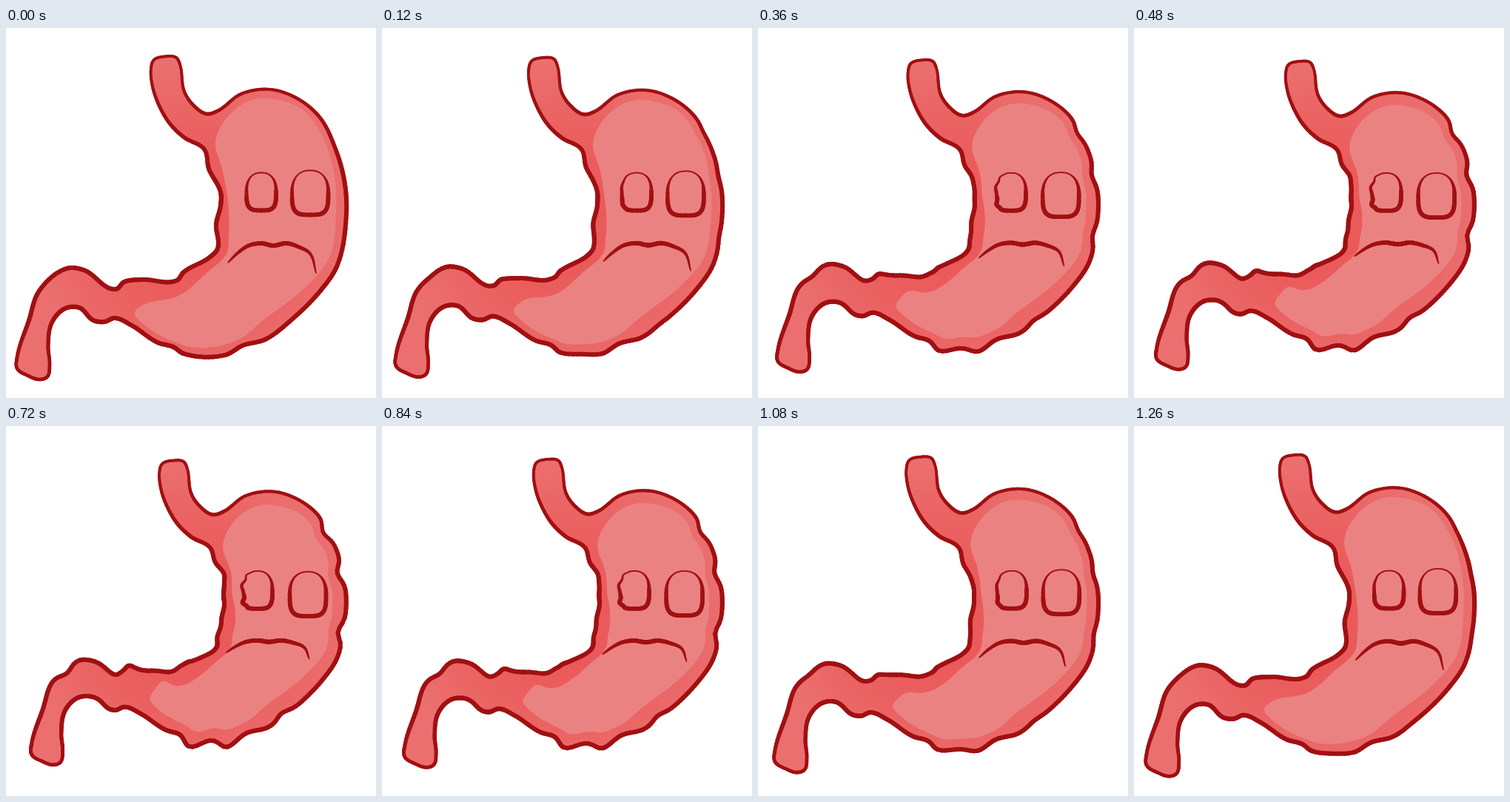
These frames come from a looping animation (500 by 500 pixels, 1.32 s). An HTML page with a canvas:

```html
<!DOCTYPE html>
<html lang="en">
<head>
<meta charset="utf-8">
<title>Sad stomach</title>
<style>
html, body { margin: 0; width: 100%; height: 100%; overflow: hidden; background: #fff; }
canvas { display: block; width: 500px; height: 500px; }
</style>
</head>
<body>
<canvas id="stage" width="500" height="500"></canvas>
<script>
const ctx = document.getElementById('stage').getContext('2d');
const LINE = '#a11013', LIGHT = '#eb8282';
const STEP = 60, STEPS = 22;

// Key points of the relaxed organ, clockwise from the top of the gullet.
const outline = [
  [196,54], [200,43], [215,38.5], [230,40], [235,49], [241,86], [253,104], [271,116],
  [286,112], [318,89], [357,83], [395,96], [425,122], [444,160], [457,205], [460,250],
  [448,320], [425,355], [385,395], [350,421], [320,429], [296,442], [240,440], [226,431],
  [205,425], [170,402], [147,392], [133,397], [118,395], [99,378], [80,379], [62,398],
  [57,430], [59,455], [56,471], [46,475], [30,470], [15,460], [15,445], [31,395],
  [45,355], [82,325], [105,327], [148,353], [160,343], [185,340], [231,341], [240,330],
  [275,310], [286,298], [284,265], [290,240], [290,222], [274,190], [268,164],
  [241,148], [222,130], [207,105], [198,79]
];
const highlight = [
  [352,95], [400,110], [428,147], [443,195], [446,250], [437,310], [405,350], [345,397],
  [318,419], [270,432], [235,427], [180,395], [174,385], [182,376], [235,361], [270,332],
  [298,305], [301,285], [300,235], [292,190], [283,155], [297,123], [325,100]
];
const mouth = [
  [300,317], [312,305], [328,294], [345,291], [361,294], [379,291], [396,296], [411,305], [419,331]
];

// Wrinkles: a spot on the wall and how far cramping drags it.
const folds = [
  [434,139, -7,3], [455,200, -8,0], [456,284, -8,0], [372,405, -4,-4], [296,442, -4,7],
  [270,442, 0,-5], [242,441, -3,8], [112,391, 2,-5], [60,336, 4,6], [152,350, -3,-15],
  [231,341, -2,-9], [287,293, -9,0], [290,230, -4,0], [276,200, 8,0], [193,371, 0,-12]
];
const FOLD_RADIUS = 14;

const clamp = v => Math.max(0, Math.min(1, v));

// Scales toward a centre by the given share of the distance.
const pull = (cx, cy, sx, sy) => ([x, y], k) => [x + k * sx * (cx - x), y + k * sy * (cy - y)];
const squeezeBody = pull(450, 180, 0.045, 0.058);
const shrinkLight = pull(345, 262, 0.05, 0.04);
const flattenMouth = pull(265, 288, 0.06, 0.38);

function cramp([x, y], k) {
  let [px, py] = squeezeBody([x, y], k);
  for (const [fx, fy, dx, dy] of folds) {
    const pulled = k * Math.exp(-((x - fx) ** 2 + (y - fy) ** 2) / FOLD_RADIUS ** 2);
    px += dx * pulled;
    py += dy * pulled;
  }
  return [px, py];
}

// Dense smooth curve through key points; tangents bisect neighbouring edges.
function smooth(points, closed) {
  const n = points.length, samples = 10, curve = [];
  const at = i => points[closed ? (i + n) % n : Math.max(0, Math.min(n - 1, i))];
  const unit = (a, b) => {
    const length = Math.hypot(b[0] - a[0], b[1] - a[1]) || 1;
    return [(b[0] - a[0]) / length, (b[1] - a[1]) / length];
  };
  const tangent = i => {
    const u = unit(at(i - 1), at(i)), v = unit(at(i), at(i + 1));
    return unit([0, 0], [u[0] + v[0], u[1] + v[1]]);
  };
  for (let i = 0; i < (closed ? n : n - 1); i++) {
    const a = at(i), b = at(i + 1), ta = tangent(i), tb = tangent(i + 1);
    const reach = Math.hypot(b[0] - a[0], b[1] - a[1]) / 3;
    for (let s = 0; s < samples; s++) {
      const t = s / samples, r = 1 - t;
      curve.push([0, 1].map(d =>
        r ** 3 * a[d] + 3 * r * r * t * (a[d] + ta[d] * reach) +
        3 * r * t * t * (b[d] - tb[d] * reach) + t ** 3 * b[d]));
    }
  }
  curve.push(at(closed ? 0 : n - 1));
  return curve;
}

// Round on top, boxy below; the left rim ripples when cramped.
function eye(cx, cy, rx, ry, ripple) {
  const power = (v, p) => Math.sign(v) * Math.abs(v) ** p;
  return Array.from({ length: 65 }, (_, i) => {
    const a = i / 64 * 2 * Math.PI, c = Math.cos(a), s = Math.sin(a);
    const p = s > 0 ? 0.55 : 0.85;
    return [cx + rx * power(c, p) + ripple * Math.sin(9 * a) * Math.max(0, -c), cy + ry * power(s, p)];
  });
}

function fill(curve, style) {
  ctx.beginPath();
  for (const point of curve) ctx.lineTo(...point);
  ctx.fillStyle = style;
  ctx.fill();
}

function ink(curve, widthAt) {
  for (let i = 1; i < curve.length; i++) {
    ctx.beginPath();
    ctx.moveTo(...curve[i - 1]);
    ctx.lineTo(...curve[i]);
    ctx.lineWidth = widthAt(...curve[i], i / curve.length);
    ctx.stroke();
  }
}

const bodyWidth = (x, y) =>
  3.8 + 2.2 * clamp((y - 60) / 130) - 1.4 * clamp((y - 390) / 60) * clamp((110 - x) / 30);
const eyeWidth = (x, y) => 1.8 + 4 * clamp((y - 198) / 30);
const mouthWidth = (x, y, u) => 1 + 5 * Math.sin(Math.PI * u) ** 0.6;

const skin = ctx.createRadialGradient(250, 265, 60, 250, 265, 220);
skin.addColorStop(0, '#eb5a5a');
skin.addColorStop(0.4, '#eb6060');
skin.addColorStop(1, '#eb6f6f');

const bodyCurve = smooth(outline, true);
const lightCurve = smooth(highlight, true);
const mouthCurve = smooth(mouth, false);

function draw(k) {
  ctx.fillStyle = '#fff';
  ctx.fillRect(0, 0, 500, 500);
  ctx.strokeStyle = LINE;
  ctx.lineCap = 'round';

  const body = bodyCurve.map(p => cramp(p, k));
  fill(body, skin);
  fill(lightCurve.map(p => shrinkLight(cramp(p, k), k)), LIGHT);
  ink(body, bodyWidth);
  ink(eye(345 - 5 * k, 221 + 0.5 * k, 20, 25.5, 2 * k), eyeWidth);
  ink(eye(411 - 3 * k, 222.5 + 4.5 * k, 24.5, 30, 0), eyeWidth);
  ink(mouthCurve.map(p => flattenMouth(p, k)), mouthWidth);
}

function tick() {
  const step = Math.floor(performance.now() / STEP) % STEPS;
  draw(Math.min(step, STEPS - step) / 10);
  requestAnimationFrame(tick);
}
tick();
</script>
</body>
</html>
```
